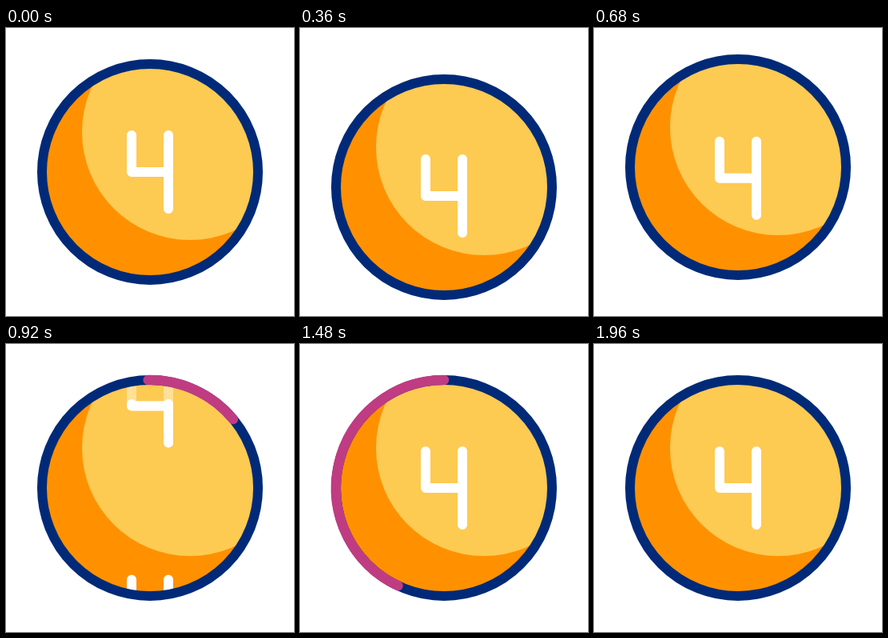
An HTML page that plays this animation: 360 by 360 pixels, repeating every 2000 ms.

```html
<!DOCTYPE html>
<html lang="en">
<head>
<meta charset="utf-8">
<title>Rolling ball counter</title>
<style>
  html, body { margin: 0; width: 100%; height: 100%; overflow: hidden; background: #fff; }
  svg { display: block; width: 100vw; height: 100vh; }
</style>
</head>
<body>
<svg viewBox="0 0 360 360">
  <defs>
    <clipPath id="disc"><circle cx="180" cy="180" r="132"/></clipPath>
    <clipPath id="solid">
      <rect x="151" y="69" width="12" height="300" rx="6"/>
      <rect x="197" y="69" width="12" height="300" rx="6"/>
      <rect x="157" y="71" width="46" height="300"/>
    </clipPath>
    <path id="four" d="M157 134V180H203M203 134V226" fill="none" stroke="#fff"
      stroke-width="12" stroke-linecap="round" stroke-linejoin="round"/>
  </defs>
  <g id="ball">
    <circle cx="180" cy="180" r="132" fill="#ff9100"/>
    <circle cx="230" cy="130" r="135" fill="#fdca52" clip-path="url(#disc)"/>
  </g>
  <!-- The leaving digit turns pale near the top -->
  <use class="leaving" href="#four" opacity=".4"/>
  <g clip-path="url(#solid)"><use class="leaving" href="#four"/></g>
  <use id="arriving" href="#four"/>
  <circle id="ring" cx="180" cy="180" r="135" fill="none" stroke="#002a78" stroke-width="12"/>
  <path id="arc" fill="none" stroke="#bf3c82" stroke-width="12.4" stroke-linecap="round"/>
</svg>
<script>
  const LOOP = 2000, STEP = 40, SPACING = 263, RADIUS = 135;
  const ballKeys = [[140, 0], [360, 19], [560, -17], [760, 0]];
  const digitKeys = [[140, 0], [360, 30], [560, -15], [750, 18], [1145, -286], [1345, -SPACING]];
  const headKeys = [[760, 0], [1440, 360]];
  const tailKeys = [[1042, -1], [1842, 360]];

  const byId = id => document.getElementById(id);
  const ball = byId('ball'), ring = byId('ring'), arc = byId('arc'), arriving = byId('arriving');
  const leaving = document.querySelectorAll('.leaving');

  // Eased value between [time, value] keys
  function track(keys, t) {
    if (t <= keys[0][0]) return keys[0][1];
    for (let i = 1; i < keys.length; i++) {
      const [t0, v0] = keys[i - 1], [t1, v1] = keys[i];
      if (t < t1) {
        const u = (t - t0) / (t1 - t0);
        return v0 + (v1 - v0) * u * u * (3 - 2 * u);
      }
    }
    return keys[keys.length - 1][1];
  }

  const moveY = (node, y) => node.setAttribute('transform', `translate(0 ${y})`);

  function rimPoint(degrees) {
    const a = degrees * Math.PI / 180;
    return `${180 + RADIUS * Math.sin(a)} ${180 - RADIUS * Math.cos(a)}`;
  }

  function arcPath(from, to) {
    const mid = (from + to) / 2, turn = `A${RADIUS} ${RADIUS} 0 0 1 `;
    return `M${rimPoint(from)}${turn}${rimPoint(mid)}${turn}${rimPoint(to)}`;
  }

  function render(t) {
    const ballY = track(ballKeys, t), digitY = track(digitKeys, t);
    moveY(ball, ballY);
    moveY(ring, ballY);
    leaving.forEach(node => moveY(node, digitY));
    moveY(arriving, digitY + SPACING);

    const head = track(headKeys, t), tail = track(tailKeys, t);
    const visible = t > headKeys[0][0] && head - tail > 0.1;
    arc.setAttribute('d', visible ? arcPath(tail, head) : '');
  }

  const start = performance.now();
  function tick() {
    const t = (performance.now() - start) % LOOP;
    render(Math.floor(t / STEP) * STEP);
    requestAnimationFrame(tick);
  }
  tick();
</script>
</body>
</html>
```
